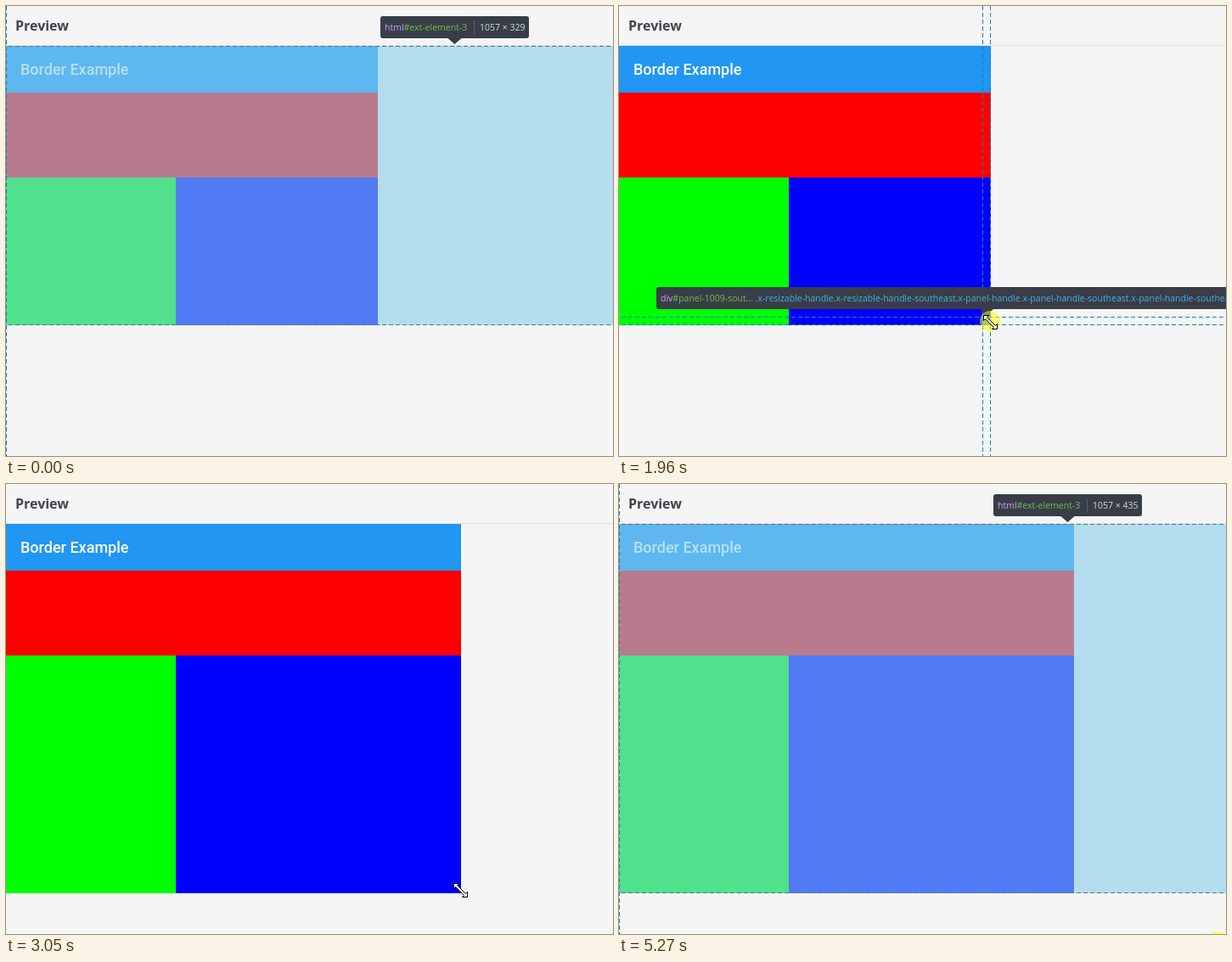
These frames come from a looping animation (715x530 px, 5.4 s). An HTML page with a canvas:

```html
<!DOCTYPE html>
<html lang="en">
<head>
<meta charset="utf-8">
<title>Resizable panel preview</title>
<style>
  html, body { margin: 0; width: 715px; height: 530px; overflow: hidden; background: #f5f5f5; }
  canvas { display: block; }
</style>
</head>
<body>
<canvas id="stage" width="715" height="530"></canvas>
<script>
const ctx = document.getElementById('stage').getContext('2d');
const W = 715, H = 530, TOP = 47, LOOP = 5400, TICK = 67.5;

// Pointer path: [tick, x, y]
const path = [
  [0, 705, 540], [1, 705, 540], [5, 348, 308], [14, 348, 308], [22, 421, 366],
  [25, 437, 372], [31, 437, 372], [40, 535, 478], [48, 535, 478],
  [54, 482, 409], [69, 482, 409], [76, 705, 540], [80, 705, 540]
];
// Inspected element from each tick on
const inspected = [
  [0, 'html'], [4, 'centre'], [24, 'handle'], [32, 'proxy'], [43, ''],
  [49, 'handle'], [51, 'centre'], [72, 'html']
];
const ARROW = [[0, 0], [0, 16], [4, 13], [6, 18], [9, 17], [7, 12], [11, 11]];
const RESIZE = [[-8, -8], [-2, -8], [-4, -6], [6, 4], [8, 2], [8, 8], [2, 8], [4, 6], [-6, -4], [-8, -2]];

const within = (n, from, to) => n >= from && n < to;

function pointerAt(tick) {
  const i = path.findIndex(key => key[0] > tick);
  const [t0, x0, y0] = path[i - 1], [t1, x1, y1] = path[i];
  const p = (tick - t0) / (t1 - t0), e = p * p * (3 - 2 * p);
  return { x: Math.round(x0 + (x1 - x0) * e), y: Math.round(y0 + (y1 - y0) * e) };
}

function rect(color, x, y, w, h) {
  ctx.fillStyle = color;
  ctx.fillRect(x, y, w, h);
}

function text(str, x, y, color, font) {
  ctx.font = font;
  ctx.fillStyle = color;
  ctx.fillText(str, x, y);
  return x + ctx.measureText(str).width;
}

function dashed(x0, y0, x1, y1, color = '#0a84c0') {
  ctx.strokeStyle = color;
  ctx.lineWidth = 1;
  ctx.setLineDash([5, 3]);
  ctx.beginPath();
  ctx.moveTo(x0, y0);
  ctx.lineTo(x1, y1);
  ctx.stroke();
  ctx.setLineDash([]);
}

function drawPage(w, h) {
  rect('#f5f5f5', 0, 0, W, H);
  rect('#e2e2e2', 0, 46, W, 1);
  text('Preview', 11, 29, '#42434f', 'bold 16px "Open Sans", sans-serif');
  rect('#2196f3', 0, TOP, w, 55);
  text('Border Example', 17, 81, '#fff', '500 18px Roboto, sans-serif');
  rect('#f00', 0, 102, w, 100);
  rect('#0f0', 0, 202, 200, TOP + h - 202);
  rect('#00f', 200, 202, w - 200, TOP + h - 202);
}

// Element box, tooltip width and label parts for each inspected element
function describe(kind, w, h, pw, ph) {
  return {
    html: { box: [0, TOP, 1057, h], tip: 175, label: ['html', '#ext-element-3', ''], rule: '#5b6f80' },
    centre: { box: [200, 202, w - 200, h - 155], tip: 307,
      label: ['div', '#panel-1012-innerCt', '.x-autocontainer-innerCt'] },
    handle: { box: [w - 10, TOP + h - 10, 10, 10], tip: 778,
      label: ['div', '#panel-1009-sout… ', '.x-resizable-handle.x-resizable-handle-southeast' +
        '.x-panel-handle.x-panel-handle-southeast.x-panel-handle-southeast-br'] },
    proxy: { box: [0, TOP, pw, ph], inset: 1, tip: 248, label: ['div', '#ext-element-4', '.x-resizable-proxy'] }
  }[kind];
}

function drawTip(cx, bottom, width, label, size) {
  const font = '10.5px "Open Sans", sans-serif';
  const left = Math.round(cx - width / 2), right = left + width, base = bottom - 9;
  ctx.fillStyle = '#383d47';
  ctx.beginPath();
  ctx.roundRect(left, bottom - 26, width, 26, 3);
  ctx.moveTo(cx - 8, bottom);
  ctx.lineTo(cx + 8, bottom);
  ctx.lineTo(cx, bottom + 7);
  ctx.fill();
  let x = left + 5;
  ['#c9a6f5', '#70bf53', '#46afe3'].forEach((color, i) => x = text(label[i], x, base, color, font));
  const sizeX = Math.round(right - 5 - ctx.measureText(size).width);
  rect('#5a626e', sizeX - 7, bottom - 21, 1, 16);
  text(size, sizeX, base, '#d3dde6', font);
}

function drawHighlight({ box: [x, y, w, h], inset = 0, tip, label, rule }) {
  rect('rgba(135,206,235,.6)', x, y, w, h);
  for (const gx of [x + inset + .5, x + w - inset - .5]) dashed(gx, 0, gx, H);
  for (const gy of [y + inset + .5, y + h - inset - .5]) dashed(3, gy, W, gy, rule);
  drawTip(x + w / 2, y - 9, tip, label, `${w} × ${h}`);
}

function drawPointer(shape, x, y) {
  ctx.beginPath();
  shape.forEach(([dx, dy]) => ctx.lineTo(x + dx + .5, y + dy + .5));
  ctx.closePath();
  ctx.fillStyle = '#fff';
  ctx.fill();
  ctx.strokeStyle = '#000';
  ctx.lineWidth = 1;
  ctx.stroke();
}

function draw(tick) {
  const { x, y } = pointerAt(tick);
  const resized = within(tick, 43, 80);
  const w = resized ? 536 : 438, h = resized ? 435 : 329;
  const kind = inspected.filter(key => key[0] <= tick).pop()[1];
  const proxyW = 438 + x - 437, proxyH = 329 + y - 372;

  drawPage(w, h);
  if (kind === 'proxy') {
    ctx.strokeStyle = '#4a5664';
    ctx.lineWidth = 1;
    ctx.strokeRect(.5, TOP + .5, proxyW - 1, proxyH - 1);
  }
  // Guide left unpainted by the browser
  if (within(tick, 51, 72)) dashed(526.5, TOP, 526.5, 102, '#0a50e0');
  if (kind) drawHighlight(describe(kind, w, h, proxyW, proxyH));

  if (within(tick, 29, 43) || tick >= 78) {
    ctx.fillStyle = 'rgba(255,255,0,.55)';
    ctx.beginPath();
    ctx.arc(x, y - 1, 12, 0, 7);
    ctx.fill();
  }
  const onHandle = within(tick, 24, 32) || within(tick, 45, 50);
  drawPointer(onHandle ? RESIZE : ARROW, x, y);
}

function loop() {
  const time = performance.now() % LOOP;
  draw(Math.min(79, Math.floor((time + 13) / TICK)));
  requestAnimationFrame(loop);
}
loop();
</script>
</body>
</html>
```
